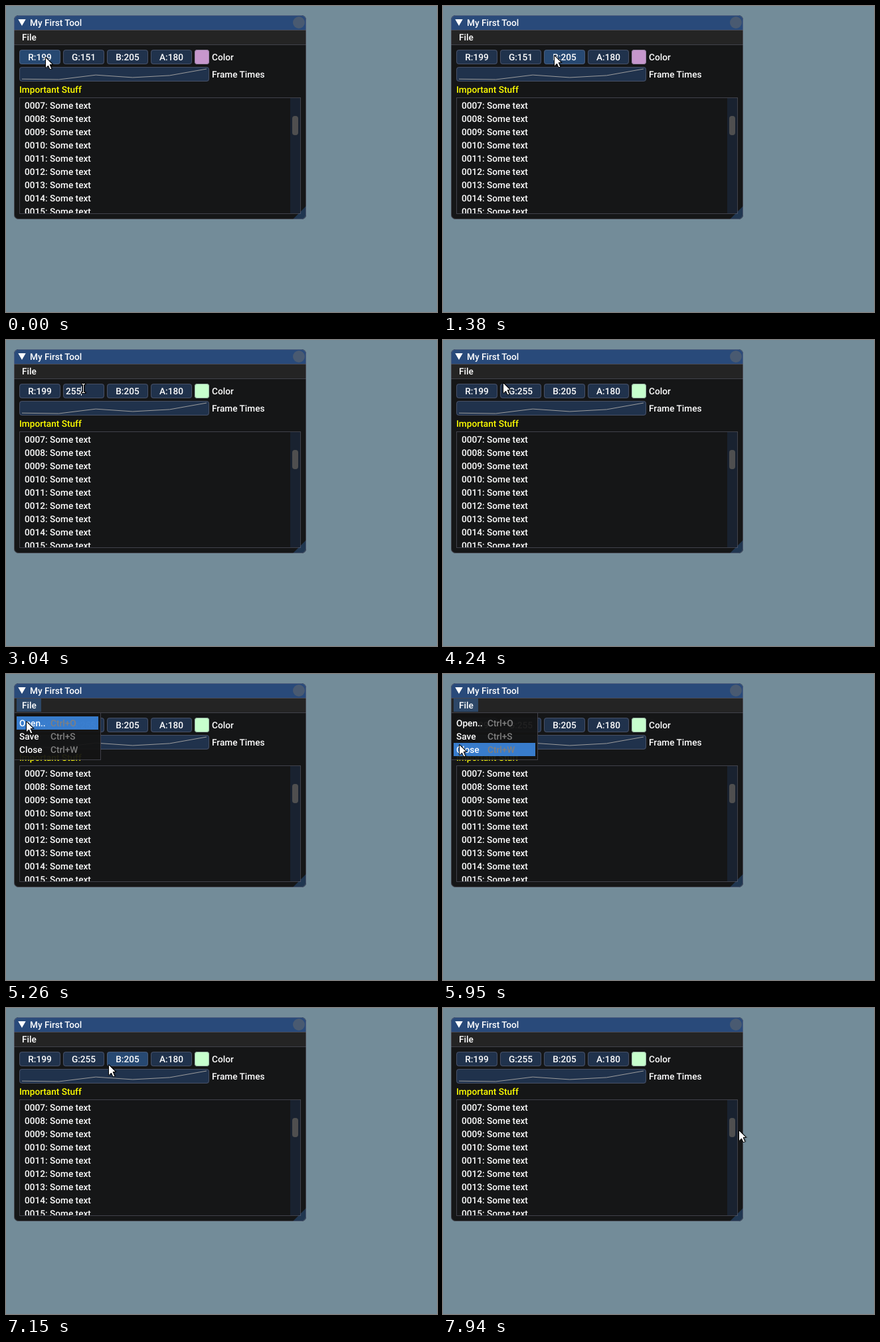
These frames come from a looping animation (649x462 px, 8000 ms). An HTML page:

```html
<!DOCTYPE html>
<html lang="en">
<head>
<meta charset="utf-8">
<title>My First Tool</title>
<style>
  html, body { margin: 0; width: 100%; height: 100%; overflow: hidden; background: #738c99; }
  svg { display: block; }
  text { font: 500 13.65px Roboto, sans-serif; fill: #fff; white-space: pre; text-rendering: geometricPrecision; }
  .mid { text-anchor: middle; }
  .dim { fill: #808080; }
  .line { fill: none; stroke: #6e6e80; stroke-opacity: .5; }
</style>
</head>
<body>
<svg id="stage" width="649" height="462" viewBox="0 0 649 462">
  <defs>
    <clipPath id="winClip"><rect x="12" y="14" width="440" height="308" rx="7"/></clipPath>
    <clipPath id="listClip"><rect x="21" y="139" width="407" height="174"/></clipPath>
    <path id="arrowShape" d="M.5 .5V16.5H1.2L4.5 13 6.9 18.5H8.6L9.6 17.4 7.2 11.5H11.5Z"/>
    <path id="beamShape" d="M0 0h7v3h-2v10h2v3h-7v-3h2v-10h-2z"/>
  </defs>
  <g clip-path="url(#winClip)">
    <rect x="12" y="14" width="440" height="308" fill="#151617"/>
    <rect x="12" y="14" width="440" height="22" fill="#294a7a"/>
    <rect x="12" y="36" width="440" height="22" fill="#242424"/>
    <path d="M452 302V322H432Z" fill="#203650"/>
  </g>
  <path class="line" d="M12 36.5H452M12 58.5H452"/>
  <rect class="line" x="12.5" y="14.5" width="439" height="307" rx="6.5"/>
  <path d="M18.3 20H29.7L24 30Z" fill="#fff"/>
  <text x="36" y="30">My First Tool</text>
  <circle cx="441" cy="25" r="9" fill="#495a71"/>
  <rect id="fileBg" x="16" y="37" width="37" height="20" fill="#4296fa"/>
  <text x="24" y="52">File</text>
  <g id="fields"></g>
  <rect id="swatch" x="284" y="66" width="22" height="22" rx="4"/>
  <rect class="line" x="284.5" y="66.5" width="21" height="21" rx="3.5"/>
  <text x="310" y="82">Color</text>
  <rect x="20" y="92" width="286" height="22" rx="4" fill="#20324c"/>
  <rect class="line" x="20.5" y="92.5" width="285" height="21" rx="3.5"/>
  <polyline id="plot" fill="none" stroke="#9c9c9c"/>
  <text x="310" y="108">Frame Times</text>
  <text x="20" y="131" style="fill:#ff0">Important Stuff</text>
  <g id="list" clip-path="url(#listClip)"></g>
  <rect x="428" y="139" width="15" height="174" fill="#192230"/>
  <rect x="431" y="166" width="9" height="29" rx="4" fill="#4f4f4f"/>
  <rect class="line" x="20.5" y="138.5" width="423" height="175"/>
  <g id="edit">
    <rect id="selection" x="90" y="68" width="23.5" height="19" fill="#4296fa" fill-opacity=".35"/>
    <text id="editText" x="90" y="82"></text>
    <path id="caret" stroke="#fff"/>
  </g>
  <g id="menu">
    <rect x="12" y="58" width="131" height="72" fill="#141414" fill-opacity=".94"/>
    <rect class="line" x="12.5" y="58.5" width="130" height="71"/>
    <rect id="itemBg" x="16" width="123" height="20" fill="#4296fa" fill-opacity=".8"/>
    <g id="items"></g>
  </g>
  <g id="arrow">
    <g fill="#000" stroke="#000" opacity=".19"><use href="#arrowShape" x="1"/></g>
    <g fill="#000" stroke="#000" opacity=".19"><use href="#arrowShape" x="2"/></g>
    <use href="#arrowShape" fill="#fff" stroke="#000"/>
  </g>
  <g id="beam">
    <use href="#beamShape" x="1" opacity=".19"/>
    <use href="#beamShape" x="2" opacity=".19"/>
    <use href="#beamShape"/>
    <path d="M1 1h5v1h-2v12h2v1h-5v-1h2v-12h-2z" fill="#fff"/>
  </g>
</svg>
<script>
const LOOP = 8000;
const $ = id => document.getElementById(id);
const set = (el, attrs) => { for (const k in attrs) el.setAttribute(k, attrs[k]); };
const show = (el, on) => { el.style.display = on ? '' : 'none'; };
const between = (v, a, b) => v >= a && v < b;

const FIELDS = [['R', 199], ['G', 151], ['B', 205], ['A', 180]];
const fieldX = i => 20 + 66 * i;
$('fields').innerHTML = FIELDS.map(([name, value], i) => {
  const x = fieldX(i);
  return `<rect class="bg" x="${x}" y="66" width="62" height="22" rx="4"/>
    <rect class="line" x="${x + .5}" y="66.5" width="61" height="21" rx="3.5"/>
    <text class="mid" x="${x + 31}" y="82">${name}:${value}</text>`;
}).join('');
const fieldBgs = [...$('fields').querySelectorAll('.bg')];
const greenLabel = $('fields').querySelectorAll('text')[1];

$('plot').setAttribute('points', [.2, .1, 1, .5, .9, 2.2]
  .map((v, i) => `${24 + 55.6 * i},${111 - 16 * (v - .1) / 2.1}`).join(' '));

$('list').innerHTML = Array.from({ length: 9 }, (_, i) =>
  `<text x="28" y="${155 + 20 * i}">${String(i + 7).padStart(4, '0')}: Some text</text>`).join('');

$('items').innerHTML = [['Open..', 'O'], ['Save', 'S'], ['Close', 'W']].map(([name, key], i) =>
  `<text x="20" y="${79 + 20 * i}">${name}</text>
   <text class="dim" x="67" y="${79 + 20 * i}">Ctrl+${key}</text>`).join('');

const linear = u => u;
const easeOut = u => 1 - (1 - u) ** 2;
const easeOutCubic = u => 1 - (1 - u) ** 3;
const smooth = u => u * u * (3 - 2 * u);

// Pointer moves: first step, last step, step count, end x, end y, easing
const START = [59, 77];
const MOVES = [
  [440, 670, 6, 112, 75, smooth],
  [900, 1000, 3, 176, 74, smooth],
  [1380, 1380, 1, 167, 74, linear],
  [1410, 1510, 3, 115, 74, easeOut],
  [2250, 2250, 1, 114, 73, linear],
  [4240, 4650, 9, 35, 44, easeOutCubic],
  [5160, 5260, 3, 30, 71, smooth],
  [5310, 5670, 7, 24, 107, easeOut],
  [5950, 6560, 13, 36, 45, smooth],
  [6870, 7660, 17, 448, 186, smooth],
  [7890, 7940, 2, 445, 184, linear]
];

function pointer(t) {
  let [x, y] = START;
  for (const [from, to, n, endX, endY, ease] of MOVES) {
    if (t < from) break;
    const step = n > 1 ? Math.floor((t - from) * (n - 1) / (to - from) + 1e-6) + 1 : 1;
    const e = ease(Math.min(step, n) / n);
    x += (endX - x) * e;
    y += (endY - y) * e;
  }
  return [Math.round(x), Math.round(y)];
}

// Value at time t from a list of [start, value]
const stepValue = (t, steps) => steps.reduce((v, [at, next]) => t >= at ? next : v, null);
const TYPED = [[0, '151'], [2660, '2'], [2890, '25'], [2990, '255']];
const GREEN = [[0, 151], [2710, 2], [2940, 25], [3040, 255]];

function fieldColor(hovered, pressed) {
  return pressed ? '#336caf' : hovered ? '#274972' : '#20324c';
}

function draw(t) {
  const [x, y] = pointer(t);
  const editing = between(t, 1920, 3450);
  const pressed = between(t, 1740, 1890);
  const menuOpen = between(t, 4880, 6640);
  const beam = between(t, 1920, 3500);

  fieldBgs.forEach((bg, i) => {
    const over = !menuOpen && between(x, fieldX(i), fieldX(i) + 62) && between(y, 66, 88);
    const green = i === 1;
    bg.setAttribute('fill', fieldColor(over && !(green && editing), green && pressed));
  });
  const g = stepValue(t, GREEN);
  greenLabel.textContent = 'G:' + g;
  show(greenLabel, !editing);
  $('swatch').setAttribute('fill', `rgb(199,${g},205)`);

  show($('edit'), editing);
  if (editing) {
    const typed = stepValue(t, TYPED);
    $('editText').textContent = typed;
    show($('selection'), t < 2660);
    const cx = Math.floor(90 + $('editText').getComputedTextLength()) + .5;
    $('caret').setAttribute('d', `M${cx} 70V84`);
  }

  const overFile = between(x, 16, 53) && between(y, 37, 58);
  $('fileBg').setAttribute('fill-opacity', overFile ? .8 : menuOpen ? .31 : 0);
  show($('menu'), menuOpen);
  const item = Math.floor((y - 64) / 20);
  show($('itemBg'), between(item, 0, 3) && between(x, 16, 139));
  $('itemBg').setAttribute('y', 64 + 20 * item);

  show($('arrow'), !beam);
  show($('beam'), beam);
  set($('arrow'), { transform: `translate(${x} ${y})` });
  set($('beam'), { transform: `translate(${x - 1} ${y - 8})` });
}

function tick() {
  draw(performance.now() % LOOP);
  requestAnimationFrame(tick);
}
tick();
</script>
</body>
</html>
```
